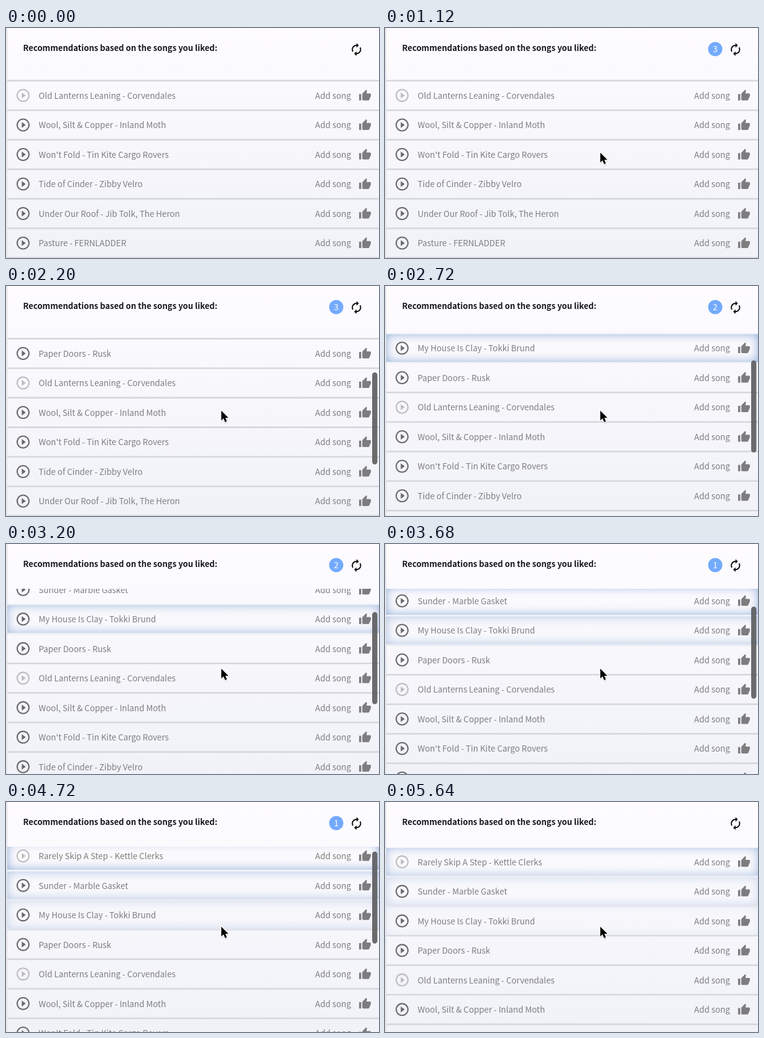
Write an HTML page that moves like this. It is 600 px wide and 370 px high and loops after 5.72 s.

```html
<!DOCTYPE html>
<html lang="en">
<head>
<meta charset="utf-8">
<title>Song recommendations</title>
<style>
  html, body { margin: 0; width: 100%; height: 100%; overflow: hidden; background: #f7f7fb; }
  svg { display: block; }
  text { font-family: "Noto Sans CJK JP", "Noto Sans CJK SC", "Noto Sans CJK", "Open Sans", sans-serif; font-size: 13.35px; }
  .label { fill: #7e7e82; }
  .glow { fill: #8ba9d6; fill-rule: evenodd; filter: blur(8px); }
</style>
</head>
<body>
<svg id="stage" width="600" height="370" viewBox="0 0 600 370">
  <defs>
    <linearGradient id="sky" x2="0" y2="1">
      <stop offset="0" stop-color="#fefcff"/>
      <stop offset="1" stop-color="#f0f2f8"/>
    </linearGradient>
    <linearGradient id="side">
      <stop offset="0" stop-color="#e2e2e5"/>
      <stop offset="1" stop-color="#ebebee"/>
    </linearGradient>
    <clipPath id="view"><rect x="2" y="72" width="598" height="298"/></clipPath>
    <path id="play" d="M10 16.5l6-4.5-6-4.5v9zM12 2C6.48 2 2 6.48 2 12s4.48 10 10 10 10-4.48 10-10S17.52 2 12 2zm0 18c-4.41 0-8-3.59-8-8s3.59-8 8-8 8 3.59 8 8-3.59 8-8 8z"/>
    <path id="like" d="M1 21h4V9H1v12zm22-11c0-1.1-.9-2-2-2h-6.31l.95-4.57.03-.32c0-.41-.17-.79-.44-1.06L14.17 1 7.59 7.59C7.22 7.95 7 8.45 7 9v10c0 1.1.9 2 2 2h9c.83 0 1.54-.5 1.84-1.22l3.02-7.05c.09-.23.14-.47.14-.73v-2z"/>
    <path id="arrow" d="M0 0V17.2L4 13.6 6.7 20.2 9.8 18.9 7.1 12.5H12.4Z"/>
  </defs>
  <rect width="600" height="370" fill="url(#sky)"/>
  <rect width="2.5" height="370" fill="url(#side)"/>
  <text x="27.5" y="37" fill="#18181b" style="font-weight:700;font-size:13.1px">Recommendations based on the songs you liked:</text>
  <g id="badge">
    <circle cx="531.2" cy="33.9" r="11.4" fill="#73aafc"/>
    <text id="count" x="531.2" y="39" fill="#fff" text-anchor="middle"></text>
  </g>
  <path transform="translate(552.4 23.2) scale(.95)" fill="#0c0c0d" d="M12 6v3l4-4-4-4v3c-4.42 0-8 3.58-8 8 0 1.57.46 3.03 1.24 4.26L6.7 14.8c-.45-.83-.7-1.79-.7-2.8 0-3.31 2.69-6 6-6zm6.76 1.74L17.3 9.2c.44.84.7 1.79.7 2.8 0 3.31-2.69 6-6 6v-3l-4 4 4 4v-3c4.42 0 8-3.58 8-8 0-1.57-.46-3.03-1.24-4.26z"/>
  <g clip-path="url(#view)"><g id="list"></g></g>
  <rect id="thumb" x="589" width="8.4" height="148" rx="4.2" fill="#58585b" fill-opacity=".88"/>
  <g id="cursor">
    <use href="#arrow" opacity=".3" transform="translate(.6 1.8)" style="filter:blur(1.2px)"/>
    <use href="#arrow" stroke="#fff" stroke-width="2.6" paint-order="stroke" stroke-linejoin="round"/>
  </g>
</svg>
<script>
const LOOP = 5720, STEP = 40, PITCH = 47.5, FIRST_Y = 108.5, ANCHOR = 4, FADE = 3600;
const $ = id => document.getElementById(id);

// muted: no preview available; seen: moment a new song is noticed
const songs = [
  { name: "Rarely Skip A Step - Kettle Clerks", muted: true, seen: 4720 },
  { name: "Sunder - Marble Gasket", seen: 3560 },
  { name: "My House Is Clay - Tokki Brund", seen: 2560 },
  { name: "Paper Doors - Rusk" },
  { name: "Old Lanterns Leaning - Corvendales", muted: true },
  { name: "Wool, Silt & Copper - Inland Moth" },
  { name: "Won't Fold - Tin Kite Cargo Rovers" },
  { name: "Tide of Cinder - Zibby Velro" },
  { name: "Under Our Roof - Jib Tolk, The Heron" },
  { name: "Pasture - FERNLADDER" }
];

// scroll offset over time: [ms, px]
const scroll = [[1880, 0], [2200, 47.5], [2720, 86.5], [3680, 125.5], [4280, 151.5], [4840, 171], [5440, 177.8]];
const END = scroll[scroll.length - 1][1];

const clamp = (v, a = 0, b = 1) => Math.min(b, Math.max(a, v));
const mix = (a, b, k) => a.map((v, i) => Math.round(v + (b[i] - v) * k));

const rate = i => (scroll[i + 1][1] - scroll[i][1]) / (scroll[i + 1][0] - scroll[i][0]);
const slopes = scroll.map((_, i) => {
  if (i === 0) return rate(0);
  if (i === scroll.length - 1) return 0;
  return 2 * rate(i - 1) * rate(i) / (rate(i - 1) + rate(i));
});

// monotone cubic through the scroll points
function offsetAt(t) {
  if (t <= scroll[0][0]) return 0;
  const i = scroll.findIndex((p, n) => n && t <= p[0]) - 1;
  if (i < 0) return END;
  const [t0, y0] = scroll[i], [t1, y1] = scroll[i + 1];
  const w = t1 - t0, u = (t - t0) / w, v = 1 - u;
  return y0 * (1 + 2 * u) * v * v + slopes[i] * w * u * v * v
       + y1 * u * u * (3 - 2 * u) - slopes[i + 1] * w * u * u * v;
}

function make(tag, attrs, parent) {
  const el = document.createElementNS("http://www.w3.org/2000/svg", tag);
  for (const key in attrs) el.setAttribute(key, attrs[key]);
  parent.appendChild(el);
  return el;
}

songs.forEach((song, i) => {
  const y = FIRST_Y + (i - ANCHOR) * PITCH;
  const row = make("g", { transform: `translate(0 ${y})` }, $("list"));
  if (song.seen) {
    const box = make("svg", { x: 2, y: -22.5, width: 598, height: 45, overflow: "hidden" }, row);
    song.glow = make("path", { class: "glow", d: "M-40-40H640V90H-40ZM0 0V45H598V0Z" }, box);
  }
  make("use", { href: "#play", transform: "translate(14.9 -12.6) scale(1.05)", fill: song.muted ? "#bcbcbf" : "#69696c" }, row);
  make("text", { x: 52.5, y: 5.4, class: "label" }, row).textContent = song.name;
  make("text", { x: 555, y: 5.4, class: "label", "text-anchor": "end" }, row).textContent = "Add song";
  make("use", { href: "#like", transform: "translate(567.1 -10.1) scale(.865)", fill: "#7d7d80" }, row);
  song.rule = make("rect", { x: 2, y: 22.5, width: 598, height: 2.5 }, row);
});

function draw(t) {
  const offset = offsetAt(t);
  $("list").setAttribute("transform", `translate(0 ${offset.toFixed(2)})`);

  const glow = songs.map(s => s.seen && t >= s.seen ? clamp(1 - (t - s.seen) / FADE) : 0);
  songs.forEach((s, i) => {
    if (s.glow) s.glow.setAttribute("opacity", glow[i]);
    const lit = Math.max(glow[i], glow[i + 1] || 0);
    s.rule.setAttribute("fill", `rgb(${mix([214, 215, 220], [243, 246, 251], lit)})`);
  });

  $("count").textContent = Math.max(1, songs.filter(s => s.seen && t < s.seen).length);
  $("badge").setAttribute("opacity", clamp((t - 320) / 80) * clamp((4800 - t) / 80));

  $("thumb").setAttribute("y", 75 + (END - offset) * 0.491);
  $("thumb").setAttribute("opacity", t < 1880 ? 0 : clamp((5640 - t) / 200));

  const p = clamp((t - 600) / 520), e = p * p * (3 - 2 * p);
  $("cursor").setAttribute("visibility", t < 640 ? "hidden" : "visible");
  $("cursor").setAttribute("transform", `translate(${-10 + 356.3 * e} ${138 + 62.4 * e}) scale(.92)`);
}

function tick() {
  const t = performance.now() % LOOP;
  draw(Math.floor(t / STEP) * STEP);
  requestAnimationFrame(tick);
}
tick();
</script>
</body>
</html>
```
